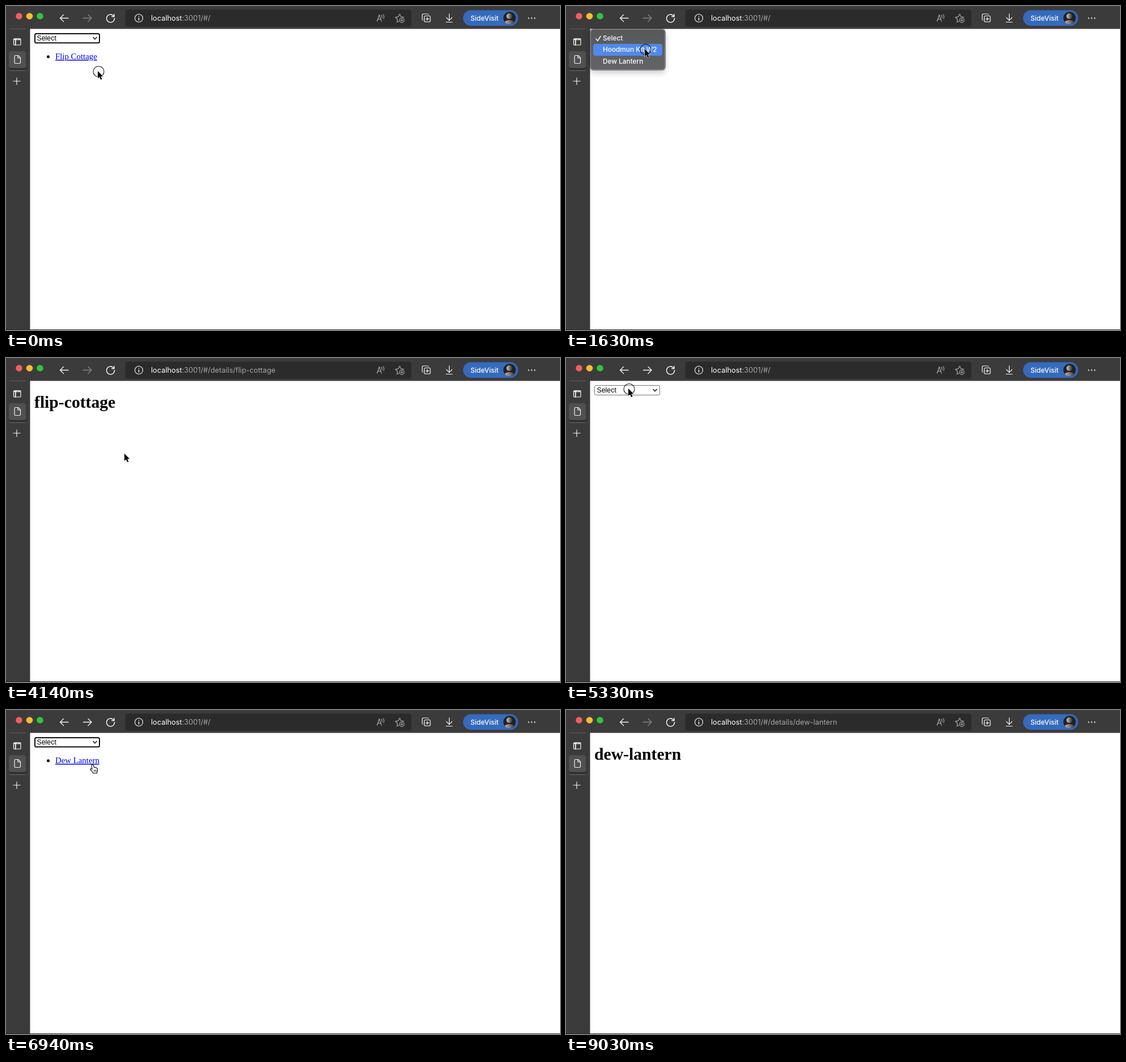
These frames come from a looping animation (978x573 px, 9.93 s). An HTML page:

```html
<!DOCTYPE html>
<html lang="en">
<head>
<meta charset="utf-8">
<title>Select and list</title>
<style>
  html, body { margin: 0; width: 100%; height: 100%; overflow: hidden; background: #fff; }
  #stage { position: relative; width: 978px; height: 573px; overflow: hidden; }
  svg { position: absolute; left: 0; top: 0; }
  .ui { font-family: Inter, "Liberation Sans", sans-serif; }
  .page { font-family: "Liberation Serif", "Noto Serif", serif; font-size: 14.83px; }
  .ico { fill: none; stroke: #f2f2f2; stroke-width: 1.2; stroke-linecap: round; stroke-linejoin: round; }
  .dim { stroke: #a8a8a8; }
  .link { fill: #0000ee; text-decoration: underline; }
  #menu, #status { position: absolute; color: #fff; white-space: nowrap; }
  #menu {
    left: 43px; top: 41px; width: 122px; padding: 5px 4px 4px; border-radius: 5px;
    border: 1px solid #8b8b8e; background: linear-gradient(#57585a, #636468);
    box-shadow: 0 0 0 .6px #222, 0 5px 11px rgba(0, 0, 0, .22);
    font-size: 11.8px; font-weight: 500;
  }
  #menu div { position: relative; height: 20.4px; line-height: 20.4px; padding-left: 17px; border-radius: 4px; }
  #menu .on { background: #5189ea; }
  #menu svg { left: 3px; top: 5px; }
  #status {
    left: 43px; top: 553px; height: 19px; line-height: 19px; padding: 0 6px 0 4px;
    background: #202122; border-radius: 0 4px 0 0; font-size: 11px;
  }
</style>
</head>
<body>
<div id="stage">
  <svg width="978" height="573">
    <rect width="978" height="573" fill="#3b3b3b"/>
    <rect x="42.5" y="40.5" width="936" height="532" fill="#fff"/>
    <rect y="572" width="978" height="1" fill="#252525"/>
    <path d="M0 569v4h4q-4 0-4-4z" fill="#111"/>

    <circle cx="23" cy="18" r="5.8" fill="#f45f57"/>
    <circle cx="41.5" cy="18" r="5.8" fill="#f6bd2f"/>
    <circle cx="60" cy="18" r="5.8" fill="#2fc540"/>

    <path d="M5.5 40.5h29M5.5 114.5h29" stroke="#626262"/>
    <rect x="5" y="81" width="30" height="31" rx="4" fill="#2a2a2a"/>
    <rect x="5" y="80" width="30" height="30" rx="4" fill="#505050"/>
    <g class="ico">
      <rect x="13.5" y="57.5" width="12.5" height="11.5" rx="2"/>
      <path d="M14 59.3h11.5M16.8 58v11" stroke-width="1.8"/>
      <path d="M16.5 87.5h5l4 4v8.500q0 1.500-1.500 1.500h-7.500q-1.500 0-1.500-1.500v-11q0-1.500 1.500-1.500zM21 87.800v4.200h4.300"/>
      <path d="M19 127v12M13 133h12"/>
      <path d="M110 21.500H95.500M101.500 15.500l-6 6 6 6" stroke-width="1.400"/>
      <path id="forward" d="M136.500 21.500H151M145 15.500l6 6-6 6" stroke-width="1.400"/>
      <path d="M190.600 18.500A7 7 0 1 0 191.500 21.500M191 14.500v4.300h-4.300" stroke-width="1.400"/>
    </g>

    <rect x="210.500" y="6.500" width="505" height="30" rx="4" fill="#2b2b2b"/>
    <g class="ico">
      <circle cx="234.500" cy="21.500" r="7"/>
      <path d="M234.500 21v4M234.500 18.200v.1" stroke-width="1.500"/>
    </g>
    <text class="ui" x="256" y="25.800" font-size="12.800" fill="#fff">localhost<tspan id="path" fill="#a5a5a5"></tspan></text>
    <g class="ico dim">
      <path d="M655 27l4-11.500 4 11.500M656.400 23.300h5.200M663 16.200q1.500 2 .4 4.500M665.800 14.800q2.600 3.400.6 7.200"/>
      <path d="M693.500 27l-3.300 1.700.9-5.200-3.800-3.700 5.200-.7 2.400-4.800 2.400 4.800 5 .7"/>
      <circle cx="698.800" cy="25.300" r="4"/>
      <path d="M698.800 23.500v3.600M697 25.300h3.600"/>
    </g>
    <g class="ico">
      <rect x="738.500" y="17.500" width="10.500" height="10.500" rx="2"/>
      <path d="M743.800 20v5.600M741 22.800h5.600M736 25q-1.200-.5-1.200-2v-6.500q0-2.500 2.500-2.500h6.500q1.500 0 2 1.200"/>
      <path d="M782.500 14v11M777.500 20.500l5 5 5-5M777 28.500h11"/>
    </g>

    <rect x="807" y="7.500" width="97" height="27.500" rx="13.700" fill="#366abc"/>
    <text class="ui" x="820" y="25.700" font-size="12" font-weight="500" fill="#fff">SideVisit</text>
    <clipPath id="disc"><circle cx="889" cy="21.300" r="11"/></clipPath>
    <linearGradient id="tone"><stop stop-color="#c9c6c3"/><stop offset="1" stop-color="#3a3a3a"/></linearGradient>
    <g clip-path="url(#disc)">
      <rect x="878" y="10" width="23" height="23" fill="#222"/>
      <circle cx="888.500" cy="18" r="5" fill="url(#tone)"/>
      <path d="M879 34q0-9 9.500-9t9.500 9z" fill="url(#tone)"/>
    </g>
    <g fill="#f2f2f2"><circle cx="922.700" cy="21.500" r="1.150"/><circle cx="928" cy="21.500" r="1.150"/><circle cx="933.300" cy="21.500" r="1.150"/></g>

    <g id="page" class="page"></g>
  </svg>

  <div id="status" class="ui"></div>
  <div id="menu" class="ui"></div>

  <svg width="978" height="573">
    <g id="mouse">
      <circle id="ring" cx="1.500" cy="1" r="9.500" fill="none" stroke="#111" stroke-width="1.100"/>
      <path id="arrow" d="M0 0V13L3 10.300 5.200 15.300 7.500 14.300 5.300 9.500H9.300Z" fill="#000" stroke="#fff" stroke-width="1.100" paint-order="stroke"/>
      <g id="hand" stroke="#000" stroke-linecap="round" stroke-linejoin="round">
        <path d="M0 .8c.9-.5 1.900 0 2.300 1l1.100 3.600c.8-.6 1.900-.3 2.200.5.8-.4 1.800 0 2 .7.9-.2 1.600.4 1.700 1.300l.3 3.400c0 1-.6 1.900-1 2.800l-.2 1.600h-6.600l-.5-1.300c-1.200-1.500-2.600-3.200-4.200-4.600-.9-.8-.3-2.200.9-2 .8.1 1.500.7 2 1.200L-1 2.600c-.2-.8.2-1.500 1-1.800z" fill="#fff" stroke-width="1.100"/>
        <path d="M3.500 10v2.800M5.400 10v2.800M7.300 10v2.800" fill="none" stroke-width=".8"/>
      </g>
    </g>
  </svg>
</div>

<script>
const LOOP = 9930, STEP = 147.8;
const A = "Flip Cottage", B = "Hoodmun Kit W2", C = "Dew Lantern";
const ITEMS = [A, B, C];
const $ = id => document.getElementById(id);
const slug = name => name.toLowerCase().replace(/ /g, "-");
const show = (el, on) => { el.style.display = on ? "" : "none"; };

// Every table below is keyed by step number.
const SCENES = [
  [0, { list: [A], focus: true }],
  [12, { list: [A, B], focus: true }],
  [25, { detail: A }],
  [32, { list: [], forward: true }],
  [43, { list: [C], focus: true, forward: true }],
  [52, { detail: C }]
];
const STATUS = [[0, ""], [3, A], [6, ""], [16, B], [20, A], [25, ""], [49, C], [52, ""]];
const MENU = [[0, false], [7, true], [12, false], [37, true], [43, false]];
const CLICKS = [0, 6, 11, 24, 31, 36, 41, 51];
const MOUSE = [
  [0, 162, 115], [1, 161, 110], [3, 152, 90], [5, 149, 62], [7, 147, 51],
  [9, 140, 72], [11, 139, 76], [13, 148, 95], [16, 167, 109], [17, 168, 110],
  [20, 140, 93], [26, 140, 93], [27, 185, 150], [28, 209, 169], [29, 165, 100],
  [30, 108, 34], [31, 102, 22], [32, 103, 23], [34, 108, 46], [36, 110, 54],
  [37, 111, 56], [39, 129, 111], [41, 129, 111], [43, 131, 112], [47, 152, 96],
  [49, 152, 95], [51, 148, 92], [52, 152, 112], [54, 186, 241], [58, 186, 241],
  [59, 430, 335], [60, 752, 470]
];

const at = (table, n) => table.filter(row => row[0] <= n).pop()[1];

function mouseAt(n) {
  const i = MOUSE.findIndex(k => k[0] >= n);
  if (i < 0) return null;
  const b = MOUSE[i], a = MOUSE[i - 1] || b;
  const u = b === a ? 0 : (n - a[0]) / (b[0] - a[0]);
  return [1, 2].map(j => a[j] + (b[j] - a[j]) * u);
}

function selectBox(list, focus) {
  const w = list.includes(B) ? 94 : 116;
  const frame = focus
    ? `<rect x="51" y="49" width="${w - 2}" height="16.200" rx="2.500" fill="#fff" stroke="#101010" stroke-width="2"/>`
    : `<rect x="50.500" y="48.500" width="${w - 1}" height="17" rx="2.500" fill="#fff" stroke="#767676"/>`;
  return frame +
    `<text x="54.500" y="61.200" font-family="'Liberation Sans', Arial, sans-serif" font-size="12.350">Select</text>` +
    `<path d="M${w + 37.500} 55l3.500 3.700 3.500-3.700" fill="none" stroke="#111" stroke-width="1.600"/>`;
}

const listItem = (name, i) => {
  const y = 94 + 16.7 * i;
  return `<circle cx="74.500" cy="${y - 4.2}" r="2.500"/><text class="link" x="87" y="${y}">${name}</text>`;
};

function drawPage({ list, detail, focus }) {
  $("page").innerHTML = detail
    ? `<text x="50" y="87.500" font-size="29.660" font-weight="700">${slug(detail)}</text>`
    : selectBox(list, focus) + list.map(listItem).join("");
}

function drawMenu(list, y) {
  const options = ["Select", ...ITEMS.filter(name => !list.includes(name))];
  const hot = Math.floor((y - 47) / 20.4);
  const tick = `<svg width="12" height="12"><path d="M2 6l3 3.500 5-8" fill="none" stroke="#fff" stroke-width="1.500" stroke-linecap="round"/></svg>`;
  $("menu").innerHTML = options.map((name, i) =>
    `<div class="${i === hot ? "on" : ""}">${i ? "" : tick}${name}</div>`).join("");
}

function render(n) {
  const scene = at(SCENES, n), open = at(MENU, n), hover = at(STATUS, n), pos = mouseAt(n);
  drawPage(scene);
  $("path").textContent = ":3001/#/" + (scene.detail ? "details/" + slug(scene.detail) : "");
  $("forward").style.stroke = scene.forward ? "#f2f2f2" : "#858585";
  show($("status"), hover);
  $("status").textContent = hover && "localhost:3001/#/details/" + slug(hover);
  show($("menu"), open);
  if (open) drawMenu(scene.list, pos[1]);

  show($("mouse"), pos);
  if (!pos) return;
  const [x, y] = pos;
  const links = scene.list ? scene.list.length : 0;
  const onLink = !open && x > 87 && x < 160 + 34 * (links - 1) && y > 81 && y < 81 + 16.7 * links;
  $("mouse").setAttribute("transform", `translate(${x} ${y})`);
  show($("ring"), CLICKS.includes(n));
  show($("arrow"), !onLink);
  show($("hand"), onLink);
}

let last = -1;
function tick() {
  const n = Math.floor((performance.now() % LOOP + 8) / STEP);
  if (n !== last) render(last = n);
  requestAnimationFrame(tick);
}
tick();
</script>
</body>
</html>
```
